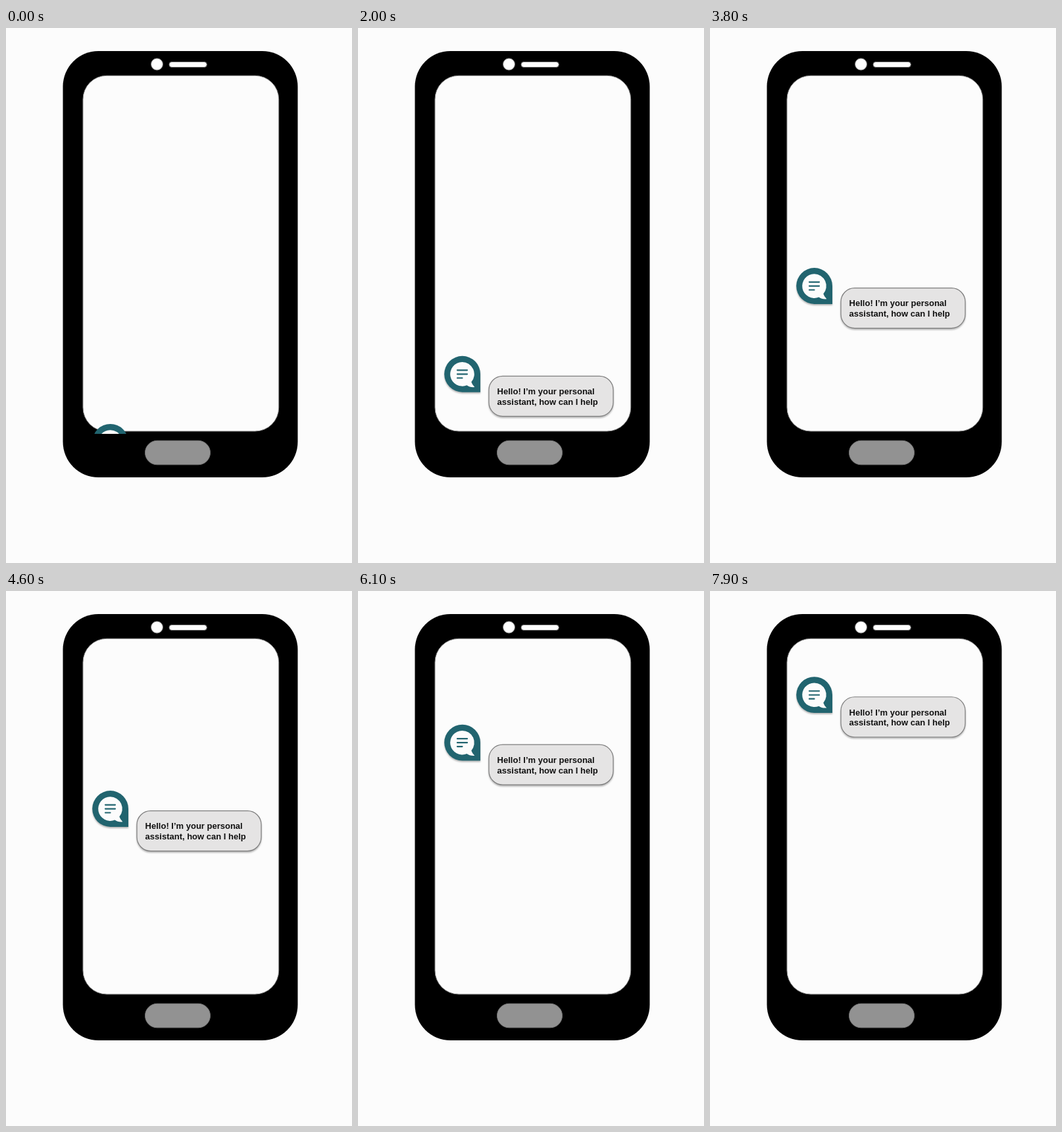
Animation, 526 px wide and 812 px high, one loop 8 s. Source, as an HTML page:

```html
<!DOCTYPE html>
<html lang="en">
<head>
<meta charset="utf-8">
<title>Phone chat</title>
<style>
  html, body { margin: 0; width: 100%; height: 100%; overflow: hidden; background: #fcfcfc; }
  svg { display: block; width: 526px; height: 812px; }
  text { font: bold 13px "Liberation Sans", Arial, sans-serif; fill: #111; }
  .soft { filter: drop-shadow(0 2px 1.2px rgba(0, 0, 0, .28)); }
</style>
</head>
<body>
<svg viewBox="0 0 526 812">
  <defs>
    <clipPath id="view"><rect x="117" y="72" width="298" height="544"/></clipPath>
  </defs>

  <!-- phone -->
  <rect x="86.5" y="35" width="357" height="647" rx="54"/>
  <rect x="117" y="72.3" width="297.7" height="539.7" rx="36" fill="#fcfcfc" stroke="#8a8a8a"/>
  <g fill="#fff" stroke="#777">
    <circle cx="229.5" cy="55" r="9"/>
    <rect x="248" y="51.5" width="57.3" height="8" rx="4"/>
  </g>
  <rect x="211.5" y="626.3" width="99" height="36.5" rx="18.2" fill="#929292" stroke="#777"/>

  <!-- message, with its top edge at y = 0 -->
  <g clip-path="url(#view)">
    <g id="message" transform="translate(0 601)">
      <g class="soft">
        <path d="M158.6 0A27.4 27.4 0 0 1 186 27.4V54.8H158.6A27.4 27.4 0 0 1 158.6 0Z" fill="#21646f"/>
      </g>
      <path d="M158.5 9.2A18.3 18.3 0 0 1 172.3 39.5Q173.5 43.5 177.3 47.2Q170 47.8 165.5 44.4A18.3 18.3 0 1 1 158.5 9.2Z" fill="#fcfcfc"/>
      <path d="M151 21.5H166M151 27.5H166M151 33.4H158.5" fill="none" stroke="#21646f" stroke-width="2.2" stroke-linecap="round"/>
      <g class="soft">
        <rect x="199" y="30.5" width="189" height="61" rx="21" fill="#e5e4e4" stroke="#7c7c7c" stroke-width="1.2"/>
      </g>
      <text x="211.6" y="58.3">Hello! I’m your personal</text>
      <text x="211.6" y="73.9">assistant, how can I help</text>
    </g>
  </g>
</svg>
<script>
  const LOOP = 8000, STEP = 100, SPAN = 900;
  // Heights at every SPAN, with one extra point before the start and after the end
  const path = [627, 601, 563, 511, 448, 379.5, 310.5, 246.5, 191.5, 149.3, 126.5, 118];
  const message = document.getElementById("message");

  // Smooth curve through the path points (Catmull-Rom)
  function heightAt(ms) {
    const i = Math.floor(ms / SPAN);
    const u = ms / SPAN - i;
    const [a, b, c, d] = path.slice(i, i + 4);
    return b + u / 2 * (c - a + u * (2 * a - 5 * b + 4 * c - d + u * (3 * (b - c) + d - a)));
  }

  const start = performance.now();
  function draw() {
    const ms = (performance.now() - start) % LOOP;
    const y = heightAt(Math.floor(ms / STEP) * STEP);
    message.setAttribute("transform", `translate(0 ${y.toFixed(2)})`);
    requestAnimationFrame(draw);
  }
  draw();
</script>
</body>
</html>
```
